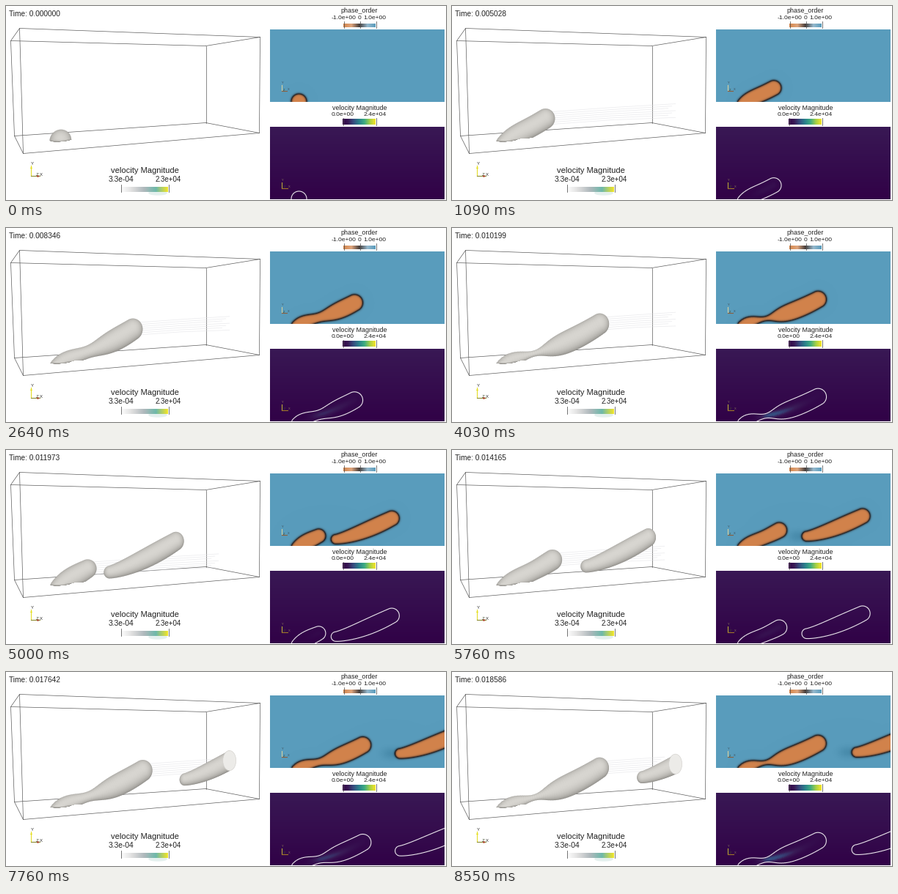
Animation, 600 px wide and 265 px high, one loop 8.58 s. Source, as a matplotlib script:

```python
import numpy as np
import matplotlib.pyplot as plt
from matplotlib.animation import FuncAnimation
from matplotlib.collections import LineCollection
from matplotlib.colors import LinearSegmentedColormap
from matplotlib.patches import Ellipse

W, H, DPI = 600, 265, 100
TICKS, STEPS = 286, 205
X0, X1, Y0, Y1 = 360, 598, 32, 131        # slice panel
VEL_DY = 133                              # offset of the velocity panel
WALL, FLOOR = 597, 130                    # domain limits in the slice
VX0, VX1, VY0, VY1 = 50, 310, 92, 192     # area of the 3D view that changes

PINCH, PERIOD = 10.8, 8.4                 # break-up time and shedding period
STEP_KEYS = np.array([0, 25, 63, 96, 106, 137, 166, 204.0])
TIME_KEYS = np.array([0, 5.028, 8.346, 10.199, PINCH, 14.165, 16.617, 18.586])

U = np.linspace(0, 1, 46)                 # position along a drop's spine

ORANGE, DARK, BLUE = (np.array(c, float) for c in
                      [(210, 131, 76), (38, 34, 36), (89, 156, 188)])


def rgb_map(*stops):
    return LinearSegmentedColormap.from_list("m", np.array(stops) / 255, 256)


FLOW = rgb_map((49, 2, 71), (58, 27, 86), (54, 78, 128), (42, 130, 140),
               (62, 172, 130), (165, 208, 70), (248, 228, 40))
FADED = rgb_map((255, 255, 255), (222, 222, 222), (175, 184, 188),
                (110, 185, 170), (240, 228, 40))
PHASE = rgb_map((215, 135, 75), (222, 165, 125), (70, 62, 60),
                (150, 185, 205), (89, 156, 188))


def sim_time(step):
    """Milliseconds of simulation at an output step (cubic Hermite)."""
    slope = np.gradient(TIME_KEYS, STEP_KEYS)
    i = min(np.searchsorted(STEP_KEYS, step, "right") - 1, len(STEP_KEYS) - 2)
    h = STEP_KEYS[i + 1] - STEP_KEYS[i]
    s = (step - STEP_KEYS[i]) / h
    a, b = TIME_KEYS[i], TIME_KEYS[i + 1]
    return (a + (b - a) * s * s * (3 - 2 * s)
            + h * s * (1 - s) * ((1 - s) * slope[i] - s * slope[i + 1]))


def neck(age):
    """How far the neck has closed, 0 to 1; the end comes suddenly."""
    s = age / PINCH
    return .72 * s ** 2.2 + .28 * s ** 25


def girth(thin, wide):
    return thin + (wide - thin) * np.sin(2.15 * U)


def rooted_drop(age, recoil):
    """Circles (x, y, r) of the drop that grows from the inlet."""
    grow = 1 - np.exp(-age / 2)
    foot_x, foot_y = 399.5 - 2.5 * grow, 130.5 - 4 * grow
    head_x = 399.5 + 5.9 * age + .38 * age ** 2 + 10 * recoil
    head_y = 130.5 - 4.15 * age + .09 * age ** 2 + 4 * recoil
    x = foot_x + (head_x - foot_x) * U
    y = foot_y + (head_y - foot_y) * U ** (1.1 + .08 * age)
    y += 7 * grow * np.exp(-(x - foot_x) / 7)
    closed = min(neck(age) + .95 * recoil, .97)
    r = girth(10.5 - 2.5 * grow, 10.5 + 1.5 * grow)
    r *= 1 - closed * np.exp(-((x - 427) / 19) ** 2)
    return np.stack([x, y, r], 1)


def free_drop(dt):
    """Circles of the drop that has broken off and drifts to the outlet."""
    snap = np.exp(-dt / .4)
    head_x, head_y = 508 + 15.4 * dt, 95 - 1.4 * dt
    tail_x, tail_y = head_x - 76 - 5 * snap, 124 - 1.85 * dt
    x = tail_x + (head_x - tail_x) * U
    y = tail_y + (head_y - tail_y) * U ** 1.35
    return np.stack([x, y, girth(6.8 - 5.8 * snap, 11)], 1)


def field(balls, x, y):
    """Signed distance to the union of balls and the nearest radius."""
    d = np.full(x.shape, 1e3, np.float32)
    rad = np.ones(x.shape, np.float32)
    for cx, cy, r in balls.astype(np.float32):
        q = np.sqrt((x - cx) ** 2 + (y - cy) ** 2) - r
        rad = np.where(q < d, r, rad)
        d = np.minimum(d, q)
    return d, rad


def homography(src, dst):
    rows, rhs = [], []
    for (x, y), (u, v) in zip(src, dst):
        rows += [[x, y, 1, 0, 0, 0, -u * x, -u * y],
                 [0, 0, 0, x, y, 1, -v * x, -v * y]]
        rhs += [u, v]
    return np.append(np.linalg.solve(rows, rhs), 1).reshape(3, 3)


def project(m, x, y):
    u, v, w = (row[0] * x + row[1] * y + row[2] for row in m)
    return u / w, v / w


def pixels(x0, x1, y0, y1):
    return np.meshgrid(np.arange(x0, x1) + .5, np.arange(y0, y1) + .5)


def mix(a, b, w):
    return a + (b - a) * w[..., None]


def to_bytes(img):
    return np.clip(img, 0, 255).astype(np.uint8)


# mid plane of the box, as seen in the 3D view
TO_VIEW = homography([(X0, Y0), (WALL, Y0), (X0, FLOOR), (WALL, FLOOR)],
                     [(11.2, 39.7), (304.9, 48.7), (16.2, 187.4), (304.5, 165.2)])
px, py = (g.astype(np.float32) for g in pixels(X0, X1, Y0, Y1))
vx, vy = (g.astype(np.float32) for g in
          project(np.linalg.inv(TO_VIEW), *pixels(VX0, VX1, VY0, VY1)))
footprint = np.hypot(vx - 400, (vy - FLOOR) * 5.8) - 10.5
base_flow = .15 * (Y1 - py) / (Y1 - Y0)

fig = plt.figure(figsize=(W / DPI, H / DPI), dpi=DPI, facecolor="white")
ax = fig.add_axes([0, 0, 1, 1])
ax.set_xlim(0, W)
ax.set_ylim(H, 0)
ax.axis("off")


def pt(px_size):
    return px_size * 72 / DPI


def label(x, y, s, size, ha="center", color="#222222", **kw):
    return ax.text(x, y, s, fontsize=pt(size), ha=ha, va="center_baseline",
                   color=color, family="Liberation Sans", **kw)


def line(xs, ys, color="#5c5c5c", width=.7, z=1):
    ax.plot(np.add(xs, .5), np.add(ys, .5), color=color, lw=pt(width), zorder=z)


def picture(x0, x1, y0, y1):
    blank = np.zeros((y1 - y0, x1 - x0, 4), np.uint8)
    return ax.imshow(blank, extent=(x0, x1, y1, y0), interpolation="nearest",
                     aspect="auto", zorder=3)


def bar(cmap, x0, x1, y0, y1, ticks, top, bottom):
    ax.imshow(np.linspace(0, 1, 128)[None], cmap=cmap, aspect="auto",
              extent=(x0, x1, y1, y0), zorder=3)
    for x in ticks:
        line([x, x], [top, bottom], "#555555", .8, 4)


def triad(x, y, up, right, c_up, c_right, ink, size):
    line([x, x], [y, y - up], c_up, 1.1, 6)
    line([x, x + right], [y, y], c_right, 1.1, 6)
    label(x + 2, y - up - 2.5, "Y", size, color=ink, zorder=6)
    label(x + right - 3, y - 1, "Z", size, color="#3c4a2a", zorder=6)
    label(x + right + 2.5, y - 1.5, "X", size, color=ink, zorder=6)


# box edges
near = [(18, 30), (346, 42), (345, 173), (23, 201)]
far = [(6, 47), (272, 54), (272, 159), (11, 177)]
for k in range(4):
    for a, b in [(near[k], near[k - 1]), (far[k], far[k - 1]), (near[k], far[k])]:
        line(*zip(a, b))

# legends
label(482, 5.5, "phase_order", 8.9)
for x, s in [(461, "-1.0e+00"), (482.5, "0"), (503, "1.0e+00")]:
    label(x, 15.5, s, 8.5)
bar(PHASE, 460, 504, 24, 29, (460, 482, 504), 20, 29)
label(482, 138.5, "velocity Magnitude", 8.9)
label(459.5, 148, "0.0e+00", 8.5)
label(503.5, 148, "2.4e+04", 8.5)
bar(FLOW, 459, 504, 154, 162, (459, 504), 152, 162)
label(189.5, 224.5, "velocity Magnitude", 11.1)
label(156.5, 236.5, "3.3e-04", 10.3)
label(221.5, 236.5, "2.3e+04", 9.8)
bar(FADED, 156, 221, 247, 254, (156, 221), 243, 253)
ax.add_patch(Ellipse((207, 255.5), 24, 5, color="#e4f0ee", zorder=2))

triad(33.5, 231.5, 14, 12, "#e3dc28", "#8a8a30", "#303030", 6)
ax.plot([34], [220], "^", ms=pt(3.2), color="#e8e020", mew=0, zorder=6)
ax.plot([43], [232], "o", ms=pt(2.6), color="#b03a2a", mew=0, zorder=6)
triad(375.5, 115, 8, 7, "#d6d2a0", "#8a6040", "#3c4c58", 4)
triad(375.5, 248, 8, 8, "#b8a838", "#a07828", "#8a7a58", 4)

clock = label(4.5, 10, "", 10.1, ha="left")
phase_img = picture(X0, X1, Y0, Y1)
flow_img = picture(X0, X1, Y0 + VEL_DY, Y1 + VEL_DY)
view_img = picture(VX0, VX1, VY0, VY1)
wisps = LineCollection([], colors="#e0e0e4", linewidths=pt(.8), zorder=2)
ax.add_collection(wisps)
cap = Ellipse((0, 0), 1, 1, fc="#ecebe8", ec="#d2d0cc", lw=pt(.6), zorder=4)
ax.add_patch(cap)


def fields(drops, x, y):
    return field(np.concatenate(drops), x, y)


def paint_phase(d, drops):
    img = mix(DARK, np.where(d[..., None] < 0, ORANGE, BLUE),
              np.tanh(np.abs(d) / 1.6) ** 1.2)
    if len(drops) > 1:
        x, y, _ = drops[1][0]
        wake = np.exp(-((px - x + 12) / 13) ** 2 - ((py - y) / 8) ** 2)
        img -= 16 * (wake * (d > 0))[..., None]
    phase_img.set_data(to_bytes(img))


def paint_flow(d, rad, age):
    closed = neck(age)
    dx = px - (424 + 16 * closed)
    jet = np.exp(-.5 * (dx / np.where(dx < 0, 11, 25)) ** 2)
    jet *= np.exp(-.5 * ((d + rad) / 3.4) ** 2) * np.clip(.5 - d, 0, 1)
    rgb = FLOW(base_flow + .48 * closed * jet)[..., :3] * 255
    rim = .92 * np.clip(1.05 - np.abs(d), 0, 1)
    flow_img.set_data(to_bytes(mix(rgb, 250., rim)))


def paint_view(drops):
    d, rad = fields(drops, vx, vy)
    below = vy > FLOOR
    d = np.where(below, footprint, d)
    rad = np.where(below, 10.5, rad)
    rim = np.clip(1 + d / rad, 0, 1)
    tilt = np.clip(np.gradient(d, axis=0), -1, 1)
    v = 146 + 68 * np.sqrt(1 - rim ** 2) - 22 * tilt * rim
    alpha = 255 * np.clip(.5 - 1.3 * d, 0, 1) * (vx <= WALL)
    view_img.set_data(to_bytes(np.stack([v, v - 2, v - 7, alpha], -1)))


def paint_cap(d):
    """Cut face where a drop leaves through the outlet."""
    rows = np.flatnonzero(d[:, WALL - X0] < 0)
    cap.set_visible(len(rows) > 1)
    if len(rows) > 1:
        x, top = project(TO_VIEW, WALL, Y0 + rows[0])
        _, low = project(TO_VIEW, WALL, Y0 + rows[-1] + 1)
        cap.set_center((x, (top + low) / 2))
        cap.width, cap.height = .66 * (low - top), low - top


def paint_wisps(tip, t):
    x, y = project(TO_VIEW, tip[0], tip[1])
    end = 305 if t < PINCH else 290
    rise = .06 * (end - x)
    wisps.set_segments([[(x, y + o), ((x + end) / 2, y + o - .6 * rise),
                         (end - 5 * (k % 3), y + 1.1 * o - rise)]
                        for k, o in enumerate(np.linspace(-9, 8, 7))])
    wisps.set_alpha(.6 * min(1, t / 4))


shown = {"step": None}


def reset():
    shown["step"] = None
    return []


def draw(tick):
    step = tick * STEPS // TICKS
    if step == shown["step"]:
        return []
    shown["step"] = step
    t = sim_time(step)
    clock.set_text(f"Time: {t / 1000:.6f}")
    if t <= PINCH:
        age = t
        drops = [rooted_drop(age, 0)]
    else:
        age = t - PERIOD
        drops = [rooted_drop(age, np.exp((PINCH - t) / .5)), free_drop(t - PINCH)]
    d, rad = fields(drops, px, py)
    paint_phase(d, drops)
    paint_flow(d, rad, age)
    paint_view(drops)
    paint_cap(d)
    paint_wisps(drops[0][-1], t)
    return []


anim = FuncAnimation(fig, draw, frames=TICKS, init_func=reset, interval=30,
                     repeat=True, repeat_delay=0, blit=False)
plt.show()
```
